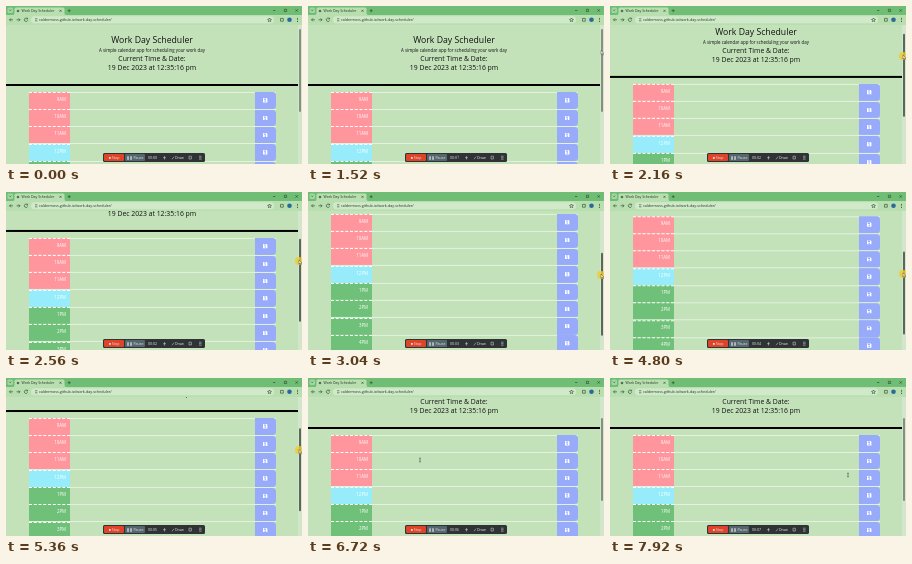
Write an HTML page that moves like this. It is 296 px wide and 158 px high and loops after 8 s.

```html
<!DOCTYPE html>
<html lang="en">
<head>
<meta charset="utf-8">
<title>Work Day Scheduler</title>
<style>
@property --scroll { syntax: "<number>"; inherits: true; initial-value: 0; }

html, body { margin: 0; width: 100%; height: 100%; overflow: hidden; }
body { background: #c3e2b9; }
.stage {
  position: relative; width: 296px; height: 158px; overflow: hidden;
  font-family: "Open Sans", "Noto Sans", sans-serif; color: #111;
  animation: scroll 8s linear infinite;
}
.stage * { box-sizing: border-box; }
.view { position: absolute; left: 0; top: 19px; width: 292px; height: 139px; overflow: hidden; }
.page {
  position: absolute; left: 0; top: -19px; width: 292px; height: 242px;
  transform: translateY(calc(var(--scroll) * -1px));
}
.line { position: absolute; left: 0; width: 292px; text-align: center; line-height: 10px; white-space: nowrap; }
.title { top: 29px; font-size: 8.7px; }
.lead { top: 38.5px; font-size: 4.4px; }
.now { top: 48px; font-size: 6.85px; }
.date { top: 56.5px; font-size: 6.85px; }
.rule { position: absolute; top: 78px; width: 100%; height: 2px; background: #000; }

.rows { position: absolute; left: 23px; top: 85.5px; width: 247px; }
.row { position: relative; height: 17.3px; border-top: .7px solid #e2f2dc; }
.hour {
  position: absolute; left: 0; top: -.7px; width: 41px; height: 17.3px; padding-right: 4px;
  border-top: .7px dashed #fff; background: var(--tone);
  color: #fff; font-size: 4.4px; line-height: 13.6px; text-align: right;
}
.past { --tone: #ff959d; }
.present { --tone: #97ecfc; }
.future { --tone: #6fc078; }
.save {
  position: absolute; right: 0; top: -.2px; width: 21px; height: 16.8px;
  border-radius: 0 3.5px 3.5px 0; background: #98aafa;
}
.save svg { position: absolute; left: 8.4px; top: 6px; width: 4.4px; height: 4.4px; }

.bar { position: absolute; left: 292px; top: 19px; width: 4px; height: 139px; background: #d3e6cc; }
.thumb {
  position: absolute; left: .8px; top: 4px; width: 2.6px; height: 83px; border-radius: 1px; background: #85917f;
  transform: translateY(calc(var(--scroll) * .59px));
  animation: press 8s step-end infinite;
}
.chrome { position: absolute; left: 0; top: 0; }

.tools {
  position: absolute; left: 97px; top: 146.5px; width: 102px; height: 9.5px; border-radius: 1.5px;
  background: #2f3335; color: #e8e8e8; font-size: 3.6px; line-height: 7.5px;
}
.tools > * { position: absolute; top: 1px; height: 7.5px; white-space: nowrap; }
.btn { width: 20px; border-radius: 1px; text-align: center; }
.stop { left: 1px; background: #df4428; }
.pause { left: 22px; background: #56666f; }
.clock { left: 45px; width: 12px; overflow: hidden; }
.digits { position: absolute; left: 7px; top: 0; animation: tick 8s steps(8) infinite; }
.digits b { display: block; height: 7.5px; font-weight: 400; }
.tools svg { left: 0; top: 0; width: 102px; height: 9.5px; }

.cursor { position: absolute; left: 0; top: 0; width: 0; height: 0; animation: move 8s linear infinite; }
.cursor svg { position: absolute; left: -6px; top: -6px; }
.spot { animation: spot 8s step-end infinite; }
.arrow { animation: arrow 8s step-end infinite; }
.beam { animation: beam 8s step-end infinite; }

@keyframes scroll {
  0%, 21% { --scroll: 0; }
  27% { --scroll: 8; }
  32% { --scroll: 40; }
  39% { --scroll: 68; }
  45%, 49% { --scroll: 82; }
  59% { --scroll: 64; }
  67% { --scroll: 46; }
  70% { --scroll: 40; }
  76%, 100% { --scroll: 29; }
}
@keyframes move {
  0% { transform: translate(150px, 151px); animation-timing-function: ease-in-out; }
  10% { transform: translate(290px, 60px); }
  14%, 21% { transform: translate(293px, 45.3px); }
  27% { transform: translate(293px, 50px); }
  32% { transform: translate(293px, 68.9px); }
  39% { transform: translate(293px, 85.4px); }
  45%, 49% { transform: translate(293px, 96.7px); }
  59% { transform: translate(293px, 83.1px); }
  67% { transform: translate(293px, 72.4px); }
  70% { transform: translate(293px, 68.9px); }
  76%, 78% { transform: translate(293px, 62.4px); animation-timing-function: ease-in-out; }
  84%, 85% { transform: translate(112px, 82px); animation-timing-function: ease-in-out; }
  95%, 100% { transform: translate(238px, 97px); }
}
@keyframes press { 0%, 78% { background: #85917f; } 21% { background: #5d665a; } }
@keyframes spot { 0%, 78% { opacity: 0; } 21% { opacity: 1; } }
@keyframes arrow { 0%, 79% { opacity: 0; } 1% { opacity: 1; } }
@keyframes beam { 0% { opacity: 0; } 79%, 100% { opacity: 1; } }
@keyframes tick { to { transform: translateY(-60px); } }
</style>
</head>
<body>
<div class="stage">
  <div class="view">
    <div class="page">
      <div class="line title">Work Day Scheduler</div>
      <div class="line lead">A simple calendar app for scheduling your work day</div>
      <div class="line now">Current Time &amp; Date:</div>
      <div class="line date">19 Dec 2023 at 12:35:16 pm</div>
      <div class="rule"></div>
      <div class="rows"></div>
    </div>
  </div>
  <div class="bar"><div class="thumb"></div></div>

  <svg class="chrome" width="296" height="19" fill="none" stroke="#29402b" stroke-width=".6">
    <g stroke="none">
      <path fill="#70bd76" d="M0 0H296V19H0Z"/>
      <path fill="#b9dfb1" d="M0 9H296V19H0Z"/>
      <path fill="#b9dfb1" d="M7 9Q8.5 9 8.5 7V3Q8.5 1.5 10 1.5H57Q58.5 1.5 58.5 3V7Q58.5 9 60 9Z"/>
      <rect x="1.5" y="1.5" width="5.5" height="5.5" rx="1.5" fill="#a1d5a1"/>
      <circle cx="12" cy="5" r="1.3" fill="#55705a"/>
      <rect x="25" y="10.3" width="243" height="7" rx="3.5" fill="#d0eac9"/>
      <circle cx="283.5" cy="13.8" r="2.3" fill="#286a9c"/>
      <g fill="#203323" font-size="3.5">
        <text x="15.5" y="6.2">Work Day Scheduler</text>
        <text x="33" y="15.2" font-size="3.7">caldermoss.github.io/work-day-scheduler/</text>
      </g>
      <g fill="#29402b">
        <circle cx="291.5" cy="12.2" r=".5"/><circle cx="291.5" cy="13.8" r=".5"/><circle cx="291.5" cy="15.4" r=".5"/>
      </g>
    </g>
    <path d="M3.2 3.7l1 1 1-1M53.5 3.8l2 2m0-2l-2 2M61.7 4.7h3m-1.5-1.5v3"/>
    <path d="M267 4.5h2.4M278.4 3.3h2.2v2.2h-2.2zM289.5 3.3l2.3 2.3m0-2.3l-2.3 2.3"/>
    <path d="M7 13.8H3.5m1.5-1.5l-1.5 1.5 1.5 1.5M10.5 13.8H14m-1.5-1.5l1.5 1.5-1.5 1.5M21.4 12.8a1.7 1.7 0 1 0 .2 1.5M21.6 11.8v1.2h-1.2"/>
    <path d="M29 12.8h2.4M29 14.8h2.4M263.5 12l.6 1.2 1.3.2-.9.9.2 1.3-1.2-.6-1.2.6.2-1.3-.9-.9 1.3-.2zM274.5 12.4h2.8v2.8h-2.8z"/>
  </svg>

  <div class="tools">
    <div class="btn stop">■ Stop</div>
    <div class="btn pause">❚❚ Pause</div>
    <div class="clock">00:0<span class="digits"></span></div>
    <div style="left:72px">Draw</div>
    <svg fill="none" stroke="#ddd" stroke-width=".5">
      <path d="M61.5 3v3.5M60 4.7h3M69 6.3l2-2.6M86 3.2h2.4v2.8H86zM96 3.2h2.6M96 4.7h2.6M96 6.2h2.6"/>
    </svg>
  </div>

  <div class="cursor">
    <svg width="14" height="14">
      <circle class="spot" cx="6" cy="6" r="4" fill="#f0cb2c" fill-opacity=".8"/>
      <path class="arrow" d="M6 5v4.2l1-.9.7 1.5.6-.3-.7-1.4h1.3z" fill="#fff" stroke="#222" stroke-width=".4"/>
      <path class="beam" d="M5.2 4.2h1.6M6 4.2v3.6M5.2 7.8h1.6" stroke="#3d4a3b" stroke-width=".6"/>
    </svg>
  </div>
</div>
<script>
const pick = sel => document.querySelector(sel);
const disk = `<svg viewBox="0 0 8 8"><path fill="#fff" fill-rule="evenodd"
  d="M0 0H6.5L8 1.5V8H0ZM1.5 1V3H5.5V1ZM4 4.2a1.3 1.3 0 1 0 .01 0Z"/></svg>`;

function row(hour) {
  const state = hour < 12 ? "past" : hour > 12 ? "future" : "present";
  const label = (hour > 12 ? hour - 12 : hour) + (hour < 12 ? "AM" : "PM");
  return `<div class="row ${state}"><div class="hour">${label}</div><div class="save">${disk}</div></div>`;
}

pick(".rows").innerHTML = Array.from({ length: 9 }, (_, i) => row(i + 9)).join("");
pick(".digits").innerHTML = Array.from({ length: 8 }, (_, i) => `<b>${i}</b>`).join("");
</script>
</body>
</html>
```
